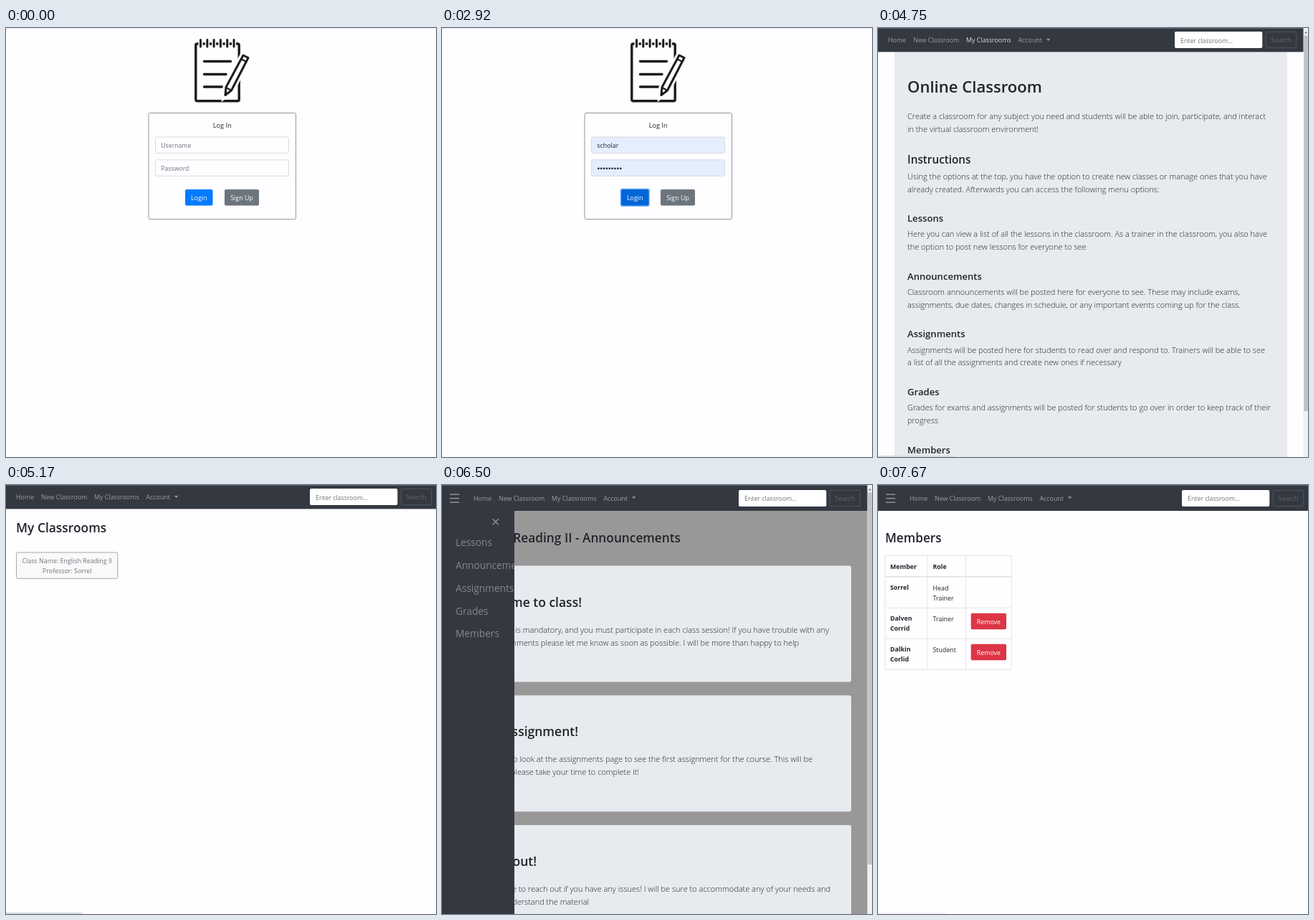
An HTML page that plays this animation: 600x598 px, repeating every 8 s.

```html
<!DOCTYPE html>
<html lang="en">
<head>
<meta charset="utf-8">
<style>
  html, body { margin: 0; width: 100%; height: 100%; overflow: hidden; background: #fefdff; }
  svg { display: block; width: 600px; height: 598px; font-family: "Open Sans", "Noto Sans", sans-serif; }
</style>
</head>
<body>
<svg id="stage" viewBox="0 0 600 598"></svg>
<script>
const LOOP = 8000, PAPER = '#fefdff', DARK = '#343841', INK = '#212529', GREY = '#6c757d', PANEL = '#e7eaee', TINT = '#e5eefc';
const SLIDE = 6301;
const stage = document.getElementById('stage');

const clamp = v => Math.max(0, Math.min(1, v));
const mix = (a, b, k) => `rgb(${a.map((v, i) => Math.round(v + (b[i] - v) * k))})`;

// The CSS "ease" timing curve.
function ease(x) {
  let lo = 0, hi = 1, s = .5;
  for (let i = 0; i < 20; i++) {
    s = (lo + hi) / 2;
    const bx = .75 * s * (1 - s) + s ** 3;
    if (bx < x) lo = s; else hi = s;
  }
  return .3 * s * (1 - s) ** 2 + 3 * s * s * (1 - s) + s ** 3;
}
const ramp = (t, start, length = 150) => ease(clamp((t - start) / length));

// Latest value of a [time, value] list.
const at = (t, steps) => steps.reduce((v, [from, next]) => t >= from ? next : v, null);

// Drawing helpers; text y is the middle of the capitals.
const rect = (x, y, w, h, fill, more = '') => `<rect x="${x}" y="${y}" width="${w}" height="${h}" fill="${fill}" ${more}/>`;
const path = (d, stroke, width, more = '') => `<path d="${d}" fill="none" stroke="${stroke}" stroke-width="${width}" ${more}/>`;
const text = (x, y, s, size = 8.9, fill = INK, more = '') =>
  `<text x="${x}" y="${y + size * .36}" font-size="${size}" fill="${fill}" ${more}>${s}</text>`;
const middle = 'text-anchor="middle"', end = 'text-anchor="end"';
const head = (x, y, s, size, more = '') => text(x, y, s, size, INK, 'font-weight="600" ' + more);
const lead = (x, y, s, more = '') => text(x, y, s, 11, INK, 'font-weight="300" ' + more);
const button = (x, y, w, s, fill) => rect(x, y, w, 22.5, fill, 'rx="2"') + text(x + w / 2, y + 11.7, s, 8.9, '#fff', middle);
const status = w => rect(0, 596, w, 2, '#d9dadc');
const dots = (x, y, step, r) => Array.from({ length: 9 }, (_, i) =>
  `<circle cx="${x + i * step}" cy="${y}" r="${r}" fill="${INK}"/>`).join('');

/* ---------- log in ---------- */

const USERS = ['scholar', 'dalkin', 'dalven'];

function notepad() {
  const black = '#1b1a1d';
  let s = rect(264.8, 22, 60.4, 79.7, 'none', `rx="2" stroke="${black}" stroke-width="3.4"`);
  for (let i = 0; i < 6; i++) {
    const x = 271.5 + i * 9.3;
    s += path(`M${x} 18V26`, PAPER, 6) + path(`M${x} 16.5V26`, black, 3, 'stroke-linecap="round"');
  }
  s += path('M276.5 46.5H313.5M276.5 64.5H307M276.5 82H302', black, 3.4, 'stroke-linecap="round"');
  const body = 'M331 38L338 41.5L314.5 87L306 93.5L307 82.5Z';
  s += path(body, PAPER, 9) + `<path d="${body}" fill="${PAPER}"/>` + path(body, black, 3, 'stroke-linejoin="round"');
  return s + path('M307 83L314.5 87M328.5 43.5L335.5 47', black, 2) + `<path d="M306 89L310 91L305 95Z" fill="${black}"/>`;
}

function field(y, fill, focus) {
  const ring = focus ? rect(207.6, y - .9, 187.8, 24.3, 'none', `rx="3" stroke="#007bff" stroke-opacity="${.27 * focus}" stroke-width="1.8"`) : '';
  return ring + rect(208.5, y, 186, 22.5, fill, `rx="2" stroke="${mix([206, 212, 218], [128, 189, 255], focus)}" stroke-width=".8"`);
}

function globe(y) {
  return `<circle cx="220" cy="${y}" r="4.1" fill="#4d5156"/>` +
    path(`M217.4 ${y - 1.4}l2.2 2l-.3 2.6M220 ${y - 2.8}l2.5 1.1l-1.2 1.6l1.7 1.5`, '#eee', 1);
}

function dropdown(pick) {
  let s = rect(207.3, 176, 187.6, 137, '#000', 'rx="2" opacity=".1"') +
    rect(208, 175, 186.5, 136.8, PAPER, 'rx="1.5" stroke="#d4d4d6" stroke-width=".6"');
  USERS.forEach((name, i) => {
    const y = 180 + i * 34.2;
    if (i === pick) s += rect(208, y, 186.5, 34, '#e4e4e5');
    s += globe(y + 16.5) + text(232, y + 10.4, name, 7.15) + dots(233.2, y + 23.4, 3.1, 1);
  });
  s += path('M208 287.7H394.5', '#dcdcde', .8);
  s += `<circle cx="220" cy="299.7" r="2.4" fill="none" stroke="#4d5156" stroke-width="2"/>` +
    `<circle cx="220" cy="299.7" r="3.6" fill="none" stroke="#4d5156" stroke-width="1.2" stroke-dasharray="1.9 1.87"/>`;
  return s + text(232, 300, 'Manage passwords...', 7.15, '#3c4043');
}

function login(t) {
  const open = t >= 750 && t < 2170, filled = t >= 2170;
  const pick = at(t, [[0, -1], [1000, 0], [1080, 1], [1170, 2], [1670, 1], [1920, 0]]);
  const fill = pick < 0 ? PAPER : TINT;
  const focus = ramp(t, 670) - ramp(t, 2750);
  const hover = ramp(t, 2420), press = ramp(t, 2750);

  let s = path('M0 .5H600', '#e6e5e8', 1) + notepad();
  s += rect(199, 118.5, 205.5, 148, 'none', 'rx="2" stroke="#8d8c90" stroke-width=".9"') + text(301.7, 135.5, 'Log In', 9.1, INK, middle);
  s += field(152, fill, focus) + field(183.8, fill, 0);
  if (pick < 0) s += text(216.3, 164, 'Username', 8.7, GREY);
  else if (filled) s += text(216.3, 164, USERS[0]);
  else s += text(216, 164.3, USERS[pick], 8.1, '#000', 'font-family="Liberation Sans, Arial, sans-serif"');
  s += pick < 0 ? text(216.3, 195.5, 'Password', 8.7, GREY) : dots(218.4, 195.8, 3.85, 1.35);
  if (press) s += rect(248.6, 223.5, 41.3, 25.5, '#007bff', `rx="3" opacity="${.5 * press}"`);
  s += button(250, 225, 38.5, 'Login', mix([0, 123, 255], [0, 101, 214], hover)) + button(305, 225, 48, 'Sign Up', GREY);
  return s + (open ? dropdown(pick) : '');
}

/* ---------- shared page parts ---------- */

function navbar({ inClass, scroll, hover }) {
  const h = inClass ? 36 : 33.4, y = inClass ? 18.5 : 17.2, dx = inClass ? 30 : 0;
  const sx = scroll ? 414 : 424, sy = Math.round(y - 12);
  let s = rect(0, 0, scroll ? 594 : 600, h, DARK) + path('M0 .5H600', '#5d6068', 1);
  if (inClass) s += path('M11 13.2H24M11 18.7H24M11 24.2H24', '#a0a2a6', 1.2);
  [['Home', 14], ['New Classroom', 49], ['My Classrooms', 123], ['Account', 195.5]].forEach(([label, x]) => {
    const color = label === hover ? '#dcdde0' : '#9b9da2';
    s += text(x + dx, y, label, 8.9, color);
    if (label === 'Account') s += `<path d="M${235 + dx} ${y - 2.2}h5.4l-2.7 2.9z" fill="${color}"/>`;
  });
  s += rect(sx, sy, 122.3, 23, '#fff', 'rx="2"') + text(sx + 8, y + .5, 'Enter classroom...', 8.8, GREY);
  return s + rect(sx + 127.3, sy + .4, 42.4, 22.3, 'none', 'rx="2" stroke="#595d65" stroke-width=".8"') +
    text(sx + 148.5, y, 'Search', 8.9, '#62666e', middle);
}

const scrollbar = bottom => rect(593.5, 0, 6.5, 598, '#f1f0f2') + rect(594.2, 10.5, 5.6, bottom - 10.5, '#c1c0c2') +
  '<path d="M595 7.4h4l-2-2.6z" fill="#77767a"/>';

/* ---------- pages ---------- */

const TOPICS = [
  ['Lessons', 'Here you can view a list of all the lessons in the classroom. As a trainer in the classroom, you also have',
    'the option to post new lessons for everyone to see'],
  ['Announcements', 'Classroom announcements will be posted here for everyone to see. These may include exams,',
    'assignments, due dates, changes in schedule, or any important events coming up for the class.'],
  ['Assignments', 'Assignments will be posted here for students to read over and respond to. Trainers will be able to see',
    'a list of all the assignments and create new ones if necessary'],
  ['Grades', 'Grades for exams and assignments will be posted for students to go over in order to keep track of their', 'progress'],
  ['Members', '', '']
];

function home(t) {
  const hover = at(t, [[0, ''], [3750, 'My Classrooms'], [3830, 'Account'], [4080, 'My Classrooms'],
    [4500, 'New Classroom'], [4750, 'My Classrooms']]);
  let s = rect(23, 33, 548, 565, PANEL) + head(41, 82, 'Online Classroom', 22.1);
  s += lead(41, 123.4, 'Create a classroom for any subject you need and students will be able to join, participate, and interact') +
    lead(41, 141.2, 'in the virtual classroom environment!');
  s += head(41, 183.5, 'Instructions', 15.3) +
    lead(41, 206.8, 'Using the options at the top, you have the option to create new classes or manage ones that you have') +
    lead(41, 224.6, 'already created. Afterwards you can access the following menu options:');
  TOPICS.forEach(([title, a, b], i) => {
    const y = 265.4 + i * 80.6;
    s += head(41, y, title, 13.1) + lead(41, y + 22, a) + lead(41, y + 39.8, b);
  });
  return s + navbar({ scroll: true, hover }) + scrollbar(534) + (t >= 4080 ? status(107) : '');
}

function classrooms(t) {
  const k = ramp(t, 5250);
  return head(14, 60, 'My Classrooms', 17.4) +
    rect(14.5, 94, 141.3, 36.4, mix([249, 249, 250], [226, 230, 234], k), 'rx="2" stroke="#9d9ca0" stroke-width=".9"') +
    text(85.2, 105.8, 'Class Name: English Reading II', 8.9, GREY, middle) +
    text(85.2, 119.8, 'Professor: Sorrel', 8.9, GREY, middle) +
    navbar({}) + status(t < 5420 ? 107 : 75);
}

// Title, first line and second line, each with the x of its right end.
const NOTICES = [
  ['Welcome to class!', 195, 'Attendance is mandatory, and you must participate in each class session! If you have trouble with any', 540,
    'of the assignments please let me know as soon as possible. I will be more than happy to help', 498],
  ['First Assignment!', 190, 'Be sure to look at the assignments page to see the first assignment for the course. This will be', 517,
    'due soon, please take your time to complete it!', 275],
  ['Reach out!', 132, 'Don’t hesitate to reach out if you have any issues! I will be sure to accommodate any of your needs and', 542,
    'help you understand the material', 205]
];

function sidebar(t) {
  const w = 148 * ramp(t, SLIDE, 500);
  if (!w) return '';
  const x = w - 26.3;
  let s = rect(0, 36, w, 562, DARK) + path(`M${x - 4} 47.3l8 8m0 -8l-8 8`, '#96989c', 1.3);
  ['Lessons', 'Announcements', 'Assignments', 'Grades', 'Members'].forEach((label, i) => {
    s += text(19, 80.5 + i * 31.7, label, 13.7, i === 4 && t >= 6920 ? '#f1f1f1' : '#85878b');
  });
  return `<clipPath id="side">${rect(0, 36, w, 562, '#000')}</clipPath><g clip-path="url(#side)">${s}</g>`;
}

function notices(t) {
  let s = rect(0, 36, 594, 562, t >= SLIDE ? '#999798' : PAPER);
  s += head(333, 74, 'English Reading II - Announcements', 17.3, end);
  NOTICES.forEach(([title, tx, a, ax, b, bx], i) => {
    const y = 112.5 + i * 180.7;
    s += rect(23, y, 548, 162, PANEL, 'rx="3"') + head(tx, y + 50.7, title, 17.5, end) +
      lead(ax, y + 89.3, a, end) + lead(bx, y + 107.2, b, end);
  });
  s += navbar({ inClass: true, scroll: true }) + scrollbar(529);
  if (t < 6170) s += status(75);
  s += sidebar(t);
  return s + (t >= 7000 ? status(95) : '');
}

function members(t) {
  const bold = 'font-weight="700"', line = '#e0e2e6';
  let s = head(10, 74, 'Members', 17.2);
  s += path('M10 98.5H186.3M10 171.3H186.3M10 214.2H186.3M10 257.4H186.3M10 98.5V257.4M69 98.5V257.4M122.5 98.5V257.4M186.3 98.5V257.4', line, .9) +
    path('M10 127.8H186.3', line, 1.5);
  [['Member', 17, 113.5], ['Role', 76.5, 113.5], ['Sorrel', 17, 143.3], ['Dalven', 17, 186.3], ['Corrid', 17, 200.3],
    ['Dalkin', 17, 229.3], ['Corlid', 17, 243.3]].forEach(([label, x, y]) => s += text(x, y, label, 8.8, INK, bold));
  [['Head', 143.3], ['Trainer', 157.3], ['Trainer', 186.3], ['Student', 229.3]].forEach(([label, y]) => s += text(76.5, y, label));
  s += button(129.7, 178.7, 49.3, 'Remove', '#dc3545') + button(129.7, 221.7, 49.3, 'Remove', '#dc3545');
  return s + navbar({ inClass: true }) + (t >= 7670 ? rect(0, 596.5, 95, 1.5, '#eeedef') : '');
}

const PAGES = [[0, login], [3000, home], [5170, classrooms], [5750, notices], [7330, members]];
let shown = '';

function draw(now) {
  const t = now % LOOP;
  const markup = rect(0, 0, 600, 598, PAPER) + at(t, PAGES)(t);
  if (markup !== shown) stage.innerHTML = shown = markup;
  requestAnimationFrame(draw);
}
draw(0);
</script>
</body>
</html>
```
